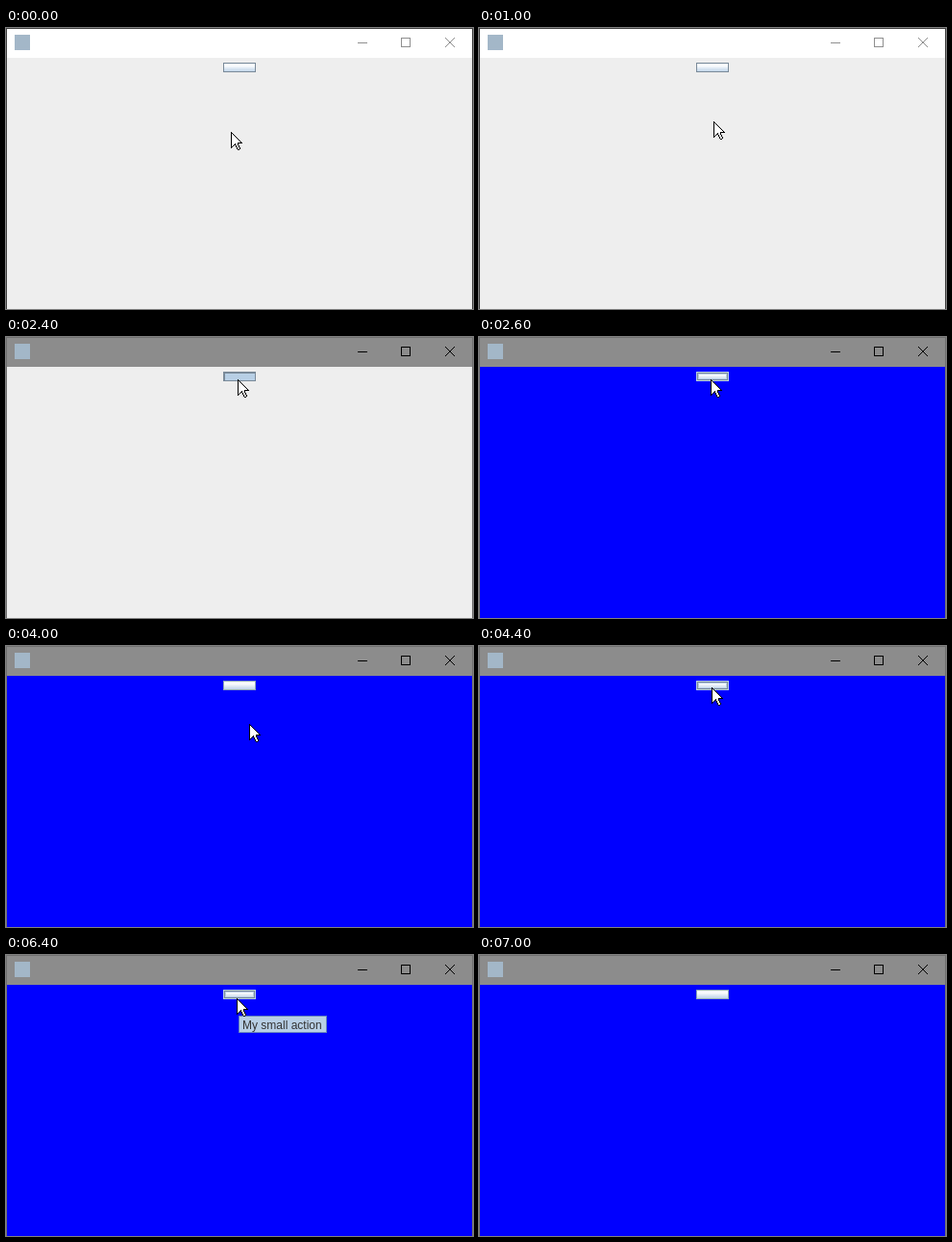
Recreate the animation shown at these times as an HTML page with a canvas. Size 486 px wide and 292 px high, loop 7.6 s.

```html
<!DOCTYPE html>
<html lang="en">
<head>
<meta charset="utf-8">
<title>Small action</title>
<style>
html, body { margin: 0; width: 100%; height: 100%; overflow: hidden; }
canvas { display: block; }
</style>
</head>
<body>
<canvas id="stage" width="486" height="292"></canvas>
<script>
const W = 486, H = 292, LOOP = 7600;
const ctx = document.getElementById('stage').getContext('2d');

// Pointer steps: start time, tip x, tip y
const steps = [
  [0, 234, 108], [1000, 244, 97], [1200, 247, 67], [1400, 242, 47],
  [1600, 241, 44], [4000, 253, 81], [4200, 252, 74], [4400, 242, 43],
  [6400, 240, 45], [6600, 247, 179], [6800, 182, 291], [7000, 182, H]
];

const within = (t, from, to) => t >= from && t < to;

function fill(color, x, y, w, h) {
  ctx.fillStyle = color;
  ctx.fillRect(x, y, w, h);
}

function frame(color, x, y, w, h) {
  ctx.strokeStyle = color;
  ctx.lineWidth = 1;
  ctx.strokeRect(x + 0.5, y + 0.5, w - 1, h - 1);
}

function drawWindow(active, blue) {
  const ink = active ? '#000' : '#8f8f8f';
  fill(active ? '#707070' : '#414141', 0, 0, W, H);
  fill(active ? '#8c8c8c' : '#fff', 1, 1, W - 2, 30);
  fill(blue ? '#00f' : '#eee', 1, 31, W - 2, H - 31);
  fill('#a3b7c8', 9, 7, 16, 16);

  fill(ink, 366, 15, 10, 1);
  frame(ink, 411, 10, 10, 10);
  ctx.beginPath();
  ctx.moveTo(457, 10);
  ctx.lineTo(467, 20);
  ctx.moveTo(467, 10);
  ctx.lineTo(457, 20);
  ctx.stroke();
}

function drawButton(state, blue) {
  const x = 226, y = 36, w = 34, h = 10;
  const edge = state === 'normal' && blue ? '#90a8b4' : '#7a8a99';
  if (state === 'pressed') {
    fill(edge, x, y, w, h);
    fill('#b8cfe5', x + 2, y + 2, w - 3, h - 3);
    return;
  }
  const shade = ctx.createLinearGradient(0, y, 0, y + h);
  shade.addColorStop(0, '#dde8f3');
  shade.addColorStop(0.3, '#fff');
  shade.addColorStop(0.6, '#dde8f3');
  shade.addColorStop(1, '#b8cfe5');
  fill(shade, x, y, w, h);
  if (state === 'hover') {
    frame('#b8cfe5', x, y, w, h);
    frame('#b8cfe5', x + 2, y + 2, w - 4, h - 4);
    frame(edge, x + 1, y + 1, w - 2, h - 2);
  } else {
    frame(edge, x, y, w, h);
  }
}

function drawTip() {
  fill('#b8cfe5', 242, 63, 92, 18);
  frame('#6382bf', 242, 63, 92, 18);
  ctx.fillStyle = '#333';
  ctx.font = '12px "Liberation Sans", Arial, sans-serif';
  ctx.fillText('My small action', 246, 77);
}

function drawPointer(x, y) {
  // One row of the arrow: black ends, white between
  const span = (row, a, b) => {
    fill('#000', x + a, y + row, b - a + 1, 1);
    if (b - a > 1) fill('#fff', x + a + 1, y + row, b - a - 1, 1);
  };
  for (let i = 0; i < 11; i++) span(i, 0, i);
  span(11, 0, 7);
  fill('#000', x + 7, y + 11, 5, 1);
  for (let i = 12; i < 17; i++) span(i, 0, 16 - i);
  for (let i = 12; i < 18; i++) {
    const a = 4 + Math.floor((i - 12) / 2);
    span(i, a, a + 3);
  }
  fill('#000', x + 7, y + 18, 2, 1);
}

function draw(t) {
  const blue = t >= 2600;
  const pressed = within(t, 2400, 2600);
  const hover = within(t, 1600, 4000) || within(t, 4400, 6600);
  drawWindow(t >= 2400, blue);
  drawButton(pressed ? 'pressed' : hover ? 'hover' : 'normal', blue);
  if (within(t, 5200, 6600)) drawTip();
  const [, x, y] = steps.filter(s => s[0] <= t).pop();
  drawPointer(x, y);
}

function tick() {
  draw(performance.now() % LOOP);
  requestAnimationFrame(tick);
}
tick();
</script>
</body>
</html>
```
